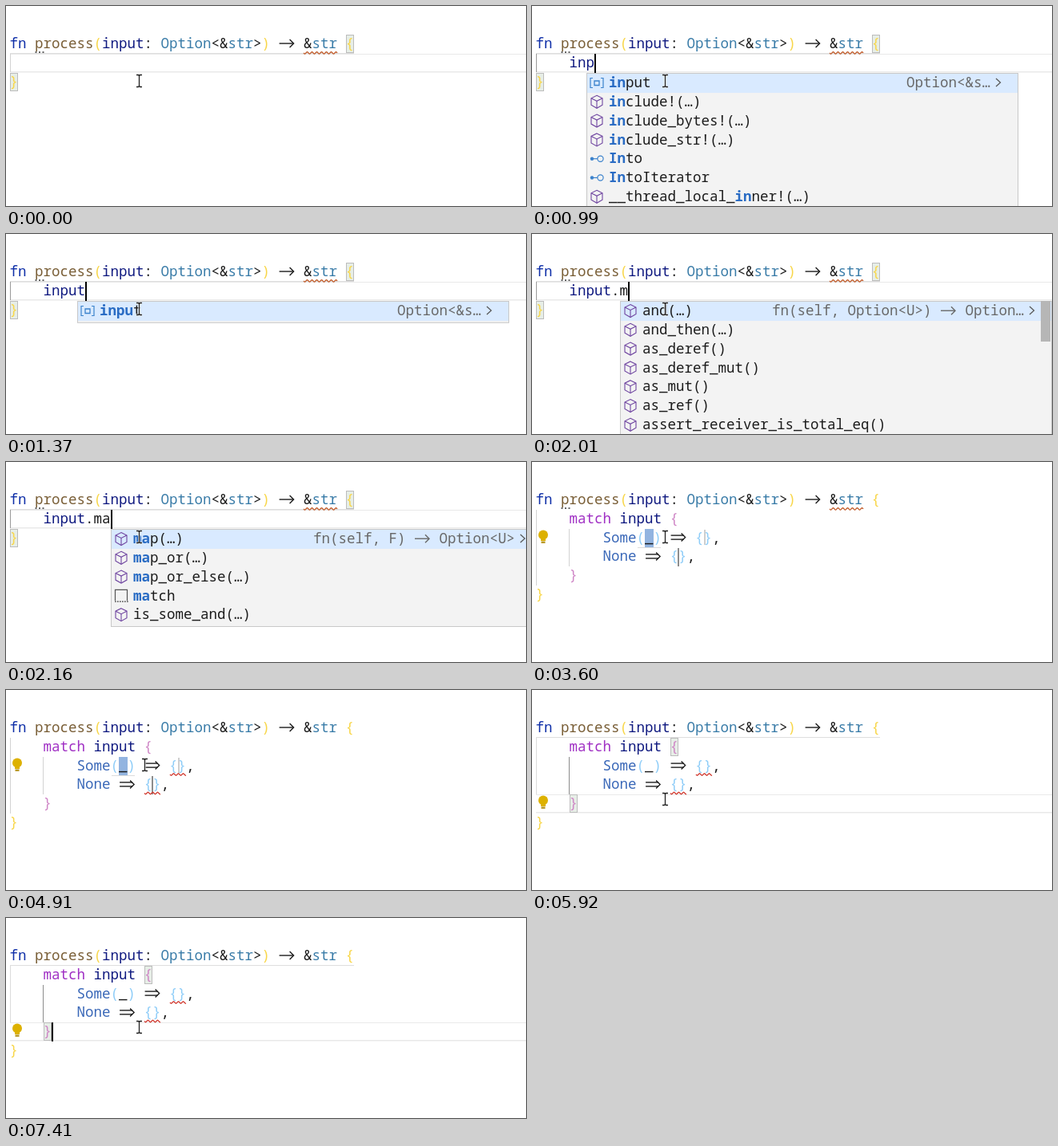
Write an HTML page with a canvas that moves like this. It is 650 by 251 pixels and loops after 7.46 s.

```html
<!DOCTYPE html>
<html lang="en">
<head>
<meta charset="utf-8">
<title>Match completion</title>
<style>
html, body { margin: 0; width: 650px; height: 251px; overflow: hidden; background: #fff; }
canvas { display: block; }
</style>
</head>
<body>
<canvas id="stage" width="650" height="251"></canvas>
<script>
const ctx = document.getElementById('stage').getContext('2d');
const LOOP = 7460, CW = 10.5, LH = 23.8, LEFT = 5, TOP = 36.2;
const FONT = '17.5px "Noto Sans Mono", "DejaVu Sans Mono", monospace';
const C = {
  ink: '#1c1c1c', key: '#0f2fa8', fn: '#795e36', type: '#3a7ca8', name: '#101a80',
  flow: '#a030c4', variant: '#3a68b8', gold: '#f8d648', pink: '#cf86c6', sky: '#8fcdf8',
  hit: '#2a6cc4', dim: '#686868', cube: '#6f45a0', blue: '#3b82cc'
};
const colX = c => LEFT + c * CW;
const lineY = n => TOP + n * LH;

function rect(x, y, w, h, color) {
  ctx.fillStyle = color;
  ctx.fillRect(x, y, w, h);
}

function path(points, color, width = 1.4, close = false) {
  ctx.beginPath();
  points.forEach(([x, y], i) => i ? ctx.lineTo(x, y) : ctx.moveTo(x, y));
  if (close) ctx.closePath();
  ctx.strokeStyle = color;
  ctx.lineWidth = width;
  ctx.stroke();
}

function ring(x, y, r, color) {
  ctx.beginPath();
  ctx.arc(x, y, r, 0, 7);
  ctx.strokeStyle = color;
  ctx.lineWidth = 1.2;
  ctx.stroke();
}

function dot(x, y, r, color) {
  ctx.beginPath();
  ctx.arc(x, y, r, 0, 7);
  ctx.fillStyle = color;
  ctx.fill();
}

// Two-cell arrows stand for the font's ligatures.
function arrow(x, y, color, double) {
  const tip = x + 19.5;
  if (double) {
    path([[x + 1, y - 2.5], [tip - 2.5, y - 2.5]], color);
    path([[x + 1, y + 2.5], [tip - 2.5, y + 2.5]], color);
  } else path([[x + 1, y], [tip - 1, y]], color);
  path([[tip - 5.5, y - 5], [tip - 0.5, y], [tip - 5.5, y + 5]], color);
}

function text(str, x, base, color, bold) {
  ctx.font = (bold ? '600 ' : '') + FONT;
  ctx.fillStyle = color;
  for (let i = 0; i < str.length; i++, x += CW) {
    const pair = str.slice(i, i + 2);
    if (pair === '->' || pair === '=>') {
      arrow(x, base - 6, color, pair === '=>');
      i++;
      x += CW;
    } else if (str[i] !== ' ') ctx.fillText(str[i], x, base);
  }
  return x;
}

function code(line, col, parts) {
  let x = colX(col) - 0.4;
  for (const [str, color] of parts) x = text(str, x, lineY(line) + 16.8, color);
}

function squiggle(x1, x2, y, color) {
  const pts = [];
  for (let x = x1; x <= x2; x += 0.5) pts.push([x, y + 1.2 * Math.sin((x - x1) * Math.PI / 3)]);
  path(pts, color, 1.3);
}

function bracketBox(line, col) {
  const x = Math.round(colX(col)), y = Math.round(lineY(line));
  rect(x, y, 10, 23, '#e7eee7');
  ctx.strokeStyle = '#bcbcbc';
  ctx.lineWidth = 1;
  ctx.strokeRect(x + 0.5, y + 0.5, 9, 22);
}

function currentLine(line) {
  const y = Math.round(lineY(line));
  rect(5, y, 645, 1, '#e9e9e9');
  rect(5, y + 22, 645, 1.5, '#e9e9e9');
}

function bulb(y) {
  dot(14, y - 2.5, 6, '#ddb100');
  rect(11, y + 1, 6, 4, '#ddb100');
  rect(11.5, y + 5.5, 5, 2.5, '#b99a2a');
}

function mouse(x, y) {
  const shape = w => {
    const color = w > 2 ? '#ffffffb0' : '#222';
    path([[x, y - 7], [x, y + 7]], color, w);
    path([[x - 3.5, y - 7.5], [x - 1, y - 7.5], [x, y - 6.5], [x + 1, y - 7.5], [x + 3.5, y - 7.5]], color, w);
    path([[x - 3.5, y + 7.5], [x - 1, y + 7.5], [x, y + 6.5], [x + 1, y + 7.5], [x + 3.5, y + 7.5]], color, w);
  };
  shape(3);
  shape(1.3);
}

const icons = {
  cube(x, y) {
    path([[x, y - 8], [x + 7, y - 4.5], [x + 7, y + 4], [x, y + 8], [x - 7, y + 4], [x - 7, y - 4.5]], C.cube, 1.1, true);
    path([[x - 7, y - 4.5], [x, y - 1], [x + 7, y - 4.5]], C.cube, 1.1);
    path([[x, y - 1], [x, y + 8]], C.cube, 1.1);
  },
  local(x, y) {
    for (const s of [-1, 1]) path([[x + s * 5, y - 6], [x + s * 8, y - 6], [x + s * 8, y + 6], [x + s * 5, y + 6]], C.blue, 1.2);
    path([[x - 3, y - 2.5], [x + 3, y - 2.5], [x + 3, y + 3], [x - 3, y + 3]], C.blue, 1.3, true);
  },
  trait(x, y) {
    ring(x + 4.5, y, 3.6, C.blue);
    dot(x - 6, y, 2.2, C.blue);
    path([[x - 4, y], [x + 1, y]], C.blue, 1.2);
  },
  snippet(x, y) {
    path([[x - 7.5, y + 6], [x - 7.5, y - 7.5], [x + 7.5, y - 7.5], [x + 7.5, y + 6]], '#555', 1.2);
    for (let i = -8; i <= 7; i += 3) rect(x + i, y + 6.5, 1.7, 1.5, '#555');
  }
};

const cubes = names => names.map(n => ['cube', n]);
const local = [['local', 'input']];
const names = [...local, ...cubes(['include!(…)', 'include_bytes!(…)', 'include_str!(…)']),
  ['trait', 'Into'], ['trait', 'IntoIterator'], ['cube', '__thread_local_inner!(…)']];
const methods = cubes(['and(…)', 'and_then(…)', 'as_deref()', 'as_deref_mut()', 'as_mut()', 'as_ref()', 'assert_receiver_is_total_eq()']);
const snippet = [['snippet', 'match']];
const maps = [...cubes(['map(…)', 'map_or(…)', 'map_or_else(…)']), ...snippet];
const someAnd = cubes(['is_some_and(…)']);
const argType = 'Option<&s…', mapType = 'fn(self, F) -> Option<U>';

const typed = [[0, ''], [720, 'i'], [810, 'in'], [990, 'inp'], [1200, 'inpu'], [1330, 'input'],
  [1600, 'input.'], [2010, 'input.m'], [2110, 'input.ma'], [2470, 'input.mat']];
// time, column, matched letters, items, detail, chevron
const popups = [[0], [900, 6, 'in', names, argType, true], [1140, 7, 'inp', local, argType, true],
  [1270, 8, 'inpu', local, argType, true], [1400, 9, 'input', local, argType, true], [1600],
  [1690, 10, '', methods, 'fn(self, Option<U>) -> Option…', true],
  [2060, 11, 'm', [...maps, ...cubes(['as_mut()', 'as_deref_mut()']), ...someAnd], mapType, true],
  [2160, 12, 'ma', [...maps, ...someAnd], mapType, true],
  [2470, 13, 'mat', snippet, 'match expr…', false], [3120]];
const pointer = [[0, 166, 94], [4910, 173, 94], [4940, 175, 101], [4990, 174, 114],
  [5040, 172, 125], [5090, 168, 133], [5170, 166, 137]];
const caretOff = [[0, 430], [2940, 3120], [3600, 4110], [4630, 5140], [5920, 6380], [6900, 7410]];
const at = (steps, t) => steps.filter(s => s[0] <= t).pop();

function popup([, col, query, items, detail, chevron]) {
  if (!items) return;
  const x = Math.floor(colX(col)), w = 540, h = items.length * LH + 3;
  rect(x, 84, w, h + 1, '#c8c8c8');
  rect(x + 1, 85, w - 2, h - 1, '#f3f3f3');
  rect(x + 1, 85, w - 2, 24, '#d9eaff');
  items.forEach(([icon, label], i) => {
    const mid = 96.5 + i * LH, base = mid + 5.7;
    icons[icon](x + 13, mid);
    const hit = query ? label.toLowerCase().indexOf(query) : -1;
    const a = Math.max(hit, 0), b = hit < 0 ? 0 : hit + query.length;
    let tx = text(label.slice(0, a), x + 28, base, C.ink);
    tx = text(label.slice(a, b), tx, base, C.hit, true);
    text(label.slice(b), tx, base, C.ink);
  });
  text(detail, x + w - 35 - detail.length * CW, 102.2, C.dim);
  if (chevron) {
    const cx = x + w - 26;
    path([[cx - 2, 91], [cx + 3.5, 96], [cx - 2, 101]], '#555', 1.2);
  }
  if (items === methods) rect(636, 84, 12, 51, '#b6b6b6');
}

function header(t) {
  if (t < 3120) bracketBox(0, 40);
  code(0, 0, [['fn ', C.key], ['process', C.fn], ['(', C.gold], ['input', C.name], [': ', C.ink],
    ['Option', C.type], ['<&', C.ink], ['str', C.type], ['>', C.ink], [')', C.gold],
    [' -> &', C.ink], ['str ', C.type], ['{', C.gold]]);
  if (t < 4200) {
    for (let i = 0; i < 3; i++) rect(36.5 + i * 4.5, 57, 2, 2, '#666');
    squiggle(372, 414, 58.8, '#bf5420');
  }
}

function typing(t) {
  const str = at(typed, t)[1];
  currentLine(1);
  rect(5, 59, 430, 1, '#dedede');
  rect(5, 60, 1, 23, t < 720 ? '#d3d3d3' : '#9a9a9a');
  bracketBox(2, 0);
  code(2, 0, [['}', C.gold]]);
  code(1, 4, [[str.slice(0, 5), C.name], [str.slice(5), C.ink]]);
  return [4 + str.length, 1];
}

function expanded(t) {
  const clicked = t >= 5410;
  if (clicked) {
    currentLine(4);
    if (t >= 5450) {
      bracketBox(1, 16);
      bracketBox(4, 4);
    }
    rect(5, 59, 430, 1, '#dedede');
    rect(5, 60, 1, 71, '#dcdcdc');
    rect(46, 84, 1, 47, t < 5500 ? '#d3d3d3' : '#8c8c8c');
  } else {
    rect(5, 60, 1, 95, '#d3d3d3');
    rect(46, 84, 1, 47, '#d3d3d3');
    rect(132, 107, 29, 1, '#dcdcdc');
    rect(141, 84, 11, 23, '#92b4e0');
    rect(215, 85, 2, 19, '#cfcfcf');
    rect(182, 108, 2, 23, '#8d8d8d');
  }
  code(1, 4, [['match ', C.flow], ['input ', C.name], ['{', C.pink]]);
  code(2, 8, [['Some', C.variant], ['(', C.sky], ['_', C.ink], [')', C.sky], [' => ', C.ink], ['{}', C.sky], [',', C.ink]]);
  code(3, 8, [['None', C.variant], [' => ', C.ink], ['{}', C.sky], [',', C.ink]]);
  code(4, 4, [['}', C.pink]]);
  code(5, 0, [['}', C.gold]]);
  if (t >= 4380) {
    squiggle(205, 225, 106, '#d03a30');
    squiggle(173, 193, 129.5, '#d03a30');
  }
  if (t >= 5680) bulb(141);
  else if (t >= 3370) bulb(94);
  return clicked ? [5, 4] : [14, 2];
}

function draw(t) {
  rect(0, 0, 650, 251, '#fff');
  const [col, line] = t < 3120 ? typing(t) : expanded(t);
  header(t);
  if (!caretOff.some(([a, b]) => t >= a && t < b))
    rect(Math.floor(colX(col)), Math.round(lineY(line)), 2, 24, '#000');
  popup(at(popups, t));
  const [, mx, my] = at(pointer, t);
  mouse(mx + 0.5, my);
}

const start = performance.now();
function tick() {
  draw((performance.now() - start) % LOOP);
  requestAnimationFrame(tick);
}
tick();
</script>
</body>
</html>
```
